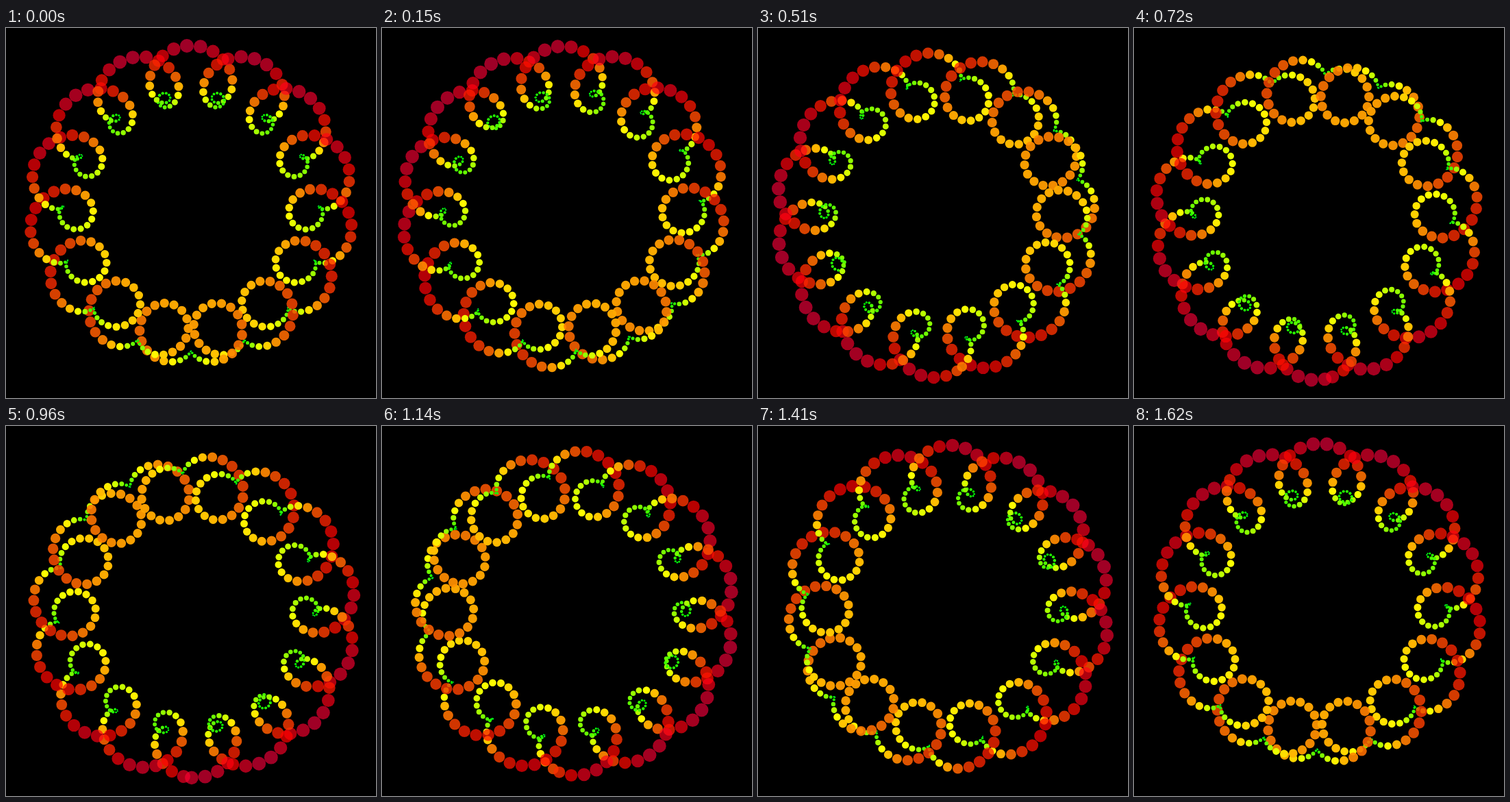
These frames come from a looping animation (540x540 px, 1650 ms). An HTML page:

```html
<!DOCTYPE html>
<html lang="en">
<head>
<meta charset="utf-8">
<title>Epicycle beads</title>
<style>
  html, body { margin: 0; width: 100%; height: 100%; overflow: hidden; background: #000; }
  svg { display: block; width: 100%; height: 100%; }
</style>
</head>
<body>
<svg id="stage" viewBox="0 0 540 540"></svg>
<script>
const LOOP = 1650, TICK = 30, CENTER = 270;
const STEP = 0.86 * Math.PI / 180, COUNT = 419;
// Three nested rotors: radius and turns per lap
const ROTORS = [[190, 1], [32.6, 15], [21.7, 30]];
const TOP_SPEED = ROTORS.reduce((sum, [r, n]) => sum + r * n, 0);

const stage = document.getElementById('stage');
const beads = Array.from({ length: COUNT }, () =>
  stage.appendChild(document.createElementNS('http://www.w3.org/2000/svg', 'circle')));

function place(bead, u, phase) {
  let up = 0, left = 0, vUp = 0, vLeft = 0;
  ROTORS.forEach(([r, n], i) => {
    const a = n * u - (i === 2 ? phase : 0);
    const c = r * Math.cos(a), s = r * Math.sin(a);
    up += c;
    left += s;
    vUp -= n * s;
    vLeft += n * c;
  });
  // Faster beads are larger, redder and more transparent
  const w = Math.pow(Math.hypot(vUp, vLeft) / TOP_SPEED, 1.3);
  bead.setAttribute('cx', (CENTER - left).toFixed(2));
  bead.setAttribute('cy', (CENTER - up).toFixed(2));
  bead.setAttribute('r', (0.4 + 9.6 * w).toFixed(2));
  bead.setAttribute('fill', `hsl(${(498 - 153 * w).toFixed(1)}, 100%, 50%)`);
  bead.setAttribute('fill-opacity', Math.min(1, 1.62 - w).toFixed(3));
}

// Beads run clockwise from the bottom
function draw(ms) {
  const t = Math.floor((ms % LOOP) / TICK) * TICK;
  const phase = 2 * Math.PI * t / LOOP;
  beads.forEach((bead, i) => place(bead, Math.PI - i * STEP, phase));
}

function tick(now) {
  draw(now);
  requestAnimationFrame(tick);
}

draw(0);
requestAnimationFrame(tick);
</script>
</body>
</html>
```
